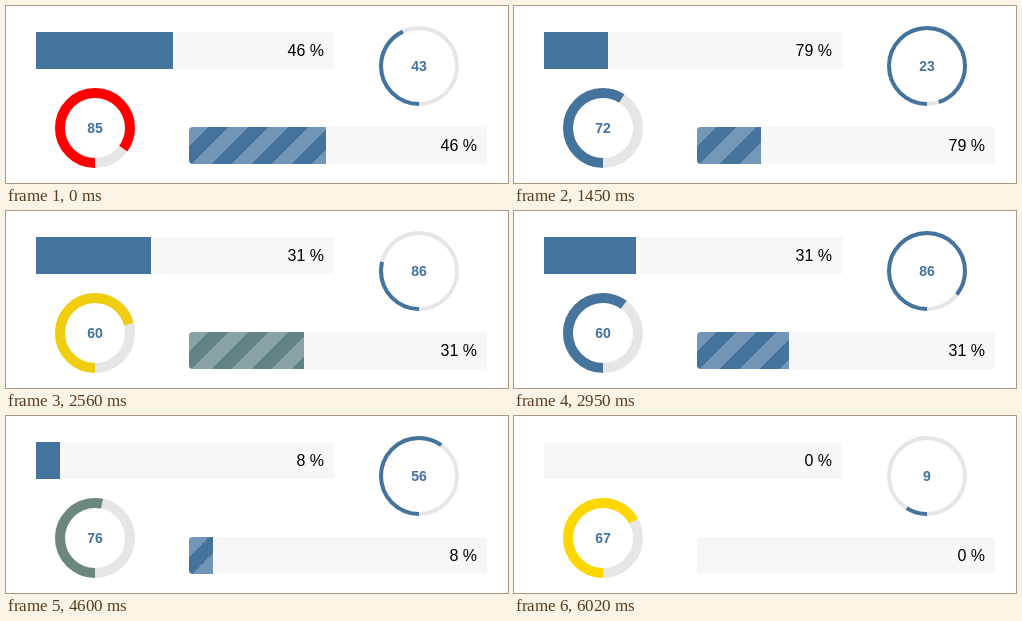
These frames come from a looping animation (502x177 px, 6.42 s). An HTML page:

```html
<!DOCTYPE html>
<html lang="en">
<head>
<meta charset="utf-8">
<style>
html, body { margin: 0; width: 100%; height: 100%; overflow: hidden; background: #fff; }
body { position: relative; font-family: "Liberation Sans", Arial, sans-serif; }
.bar { position: absolute; width: 298px; height: 37px; background: #f7f7f7; overflow: hidden; }
.bar i { display: block; height: 100%; background-color: #44739e; }
.bar b { position: absolute; right: 10px; top: 0; font: 16px/37px "Liberation Sans", Arial, sans-serif; color: #000; }
#plain { left: 30px; top: 26px; }
#striped { left: 183px; top: 121px; border-radius: 4px; }
#striped i {
  background-image: linear-gradient(135deg, #ffffff40 25%, #fff0 25%, #fff0 50%, #ffffff40 50%, #ffffff40 75%, #fff0 75%);
  background-size: 40px 40px;
}
.ring { position: absolute; width: 80px; height: 80px; }
.ring svg { position: absolute; left: 0; top: 0; transform: rotate(90deg); }
.ring circle { fill: none; stroke: #e6e6e6; }
.ring circle + circle { stroke: #44739e; }
.ring b { position: absolute; inset: 0; text-align: center; font-size: 14px; line-height: 80px; color: #44739e; }
#thick { left: 49px; top: 82px; }
#thick circle { stroke-width: 10px; }
#thin { left: 373px; top: 20px; }
#thin circle { stroke-width: 4px; }
</style>
</head>
<body>
<div class="bar" id="plain"><i></i><b></b></div>
<div class="bar" id="striped"><i></i><b></b></div>
<div class="ring" id="thick">
  <svg width="80" height="80"><circle cx="40" cy="40" r="35"/><circle cx="40" cy="40" r="35" pathLength="100"/></svg><b></b>
</div>
<div class="ring" id="thin">
  <svg width="80" height="80"><circle cx="40" cy="40" r="38"/><circle cx="40" cy="40" r="38" pathLength="100"/></svg><b></b>
</div>
<script>
const LOOP = 6420, BAR_TIME = 250, RING_TIME = 650;
const BLUE = [68, 115, 158], GOLD = [255, 215, 0], RED = [255, 0, 0];

// start time, bar value, thick ring value, thin ring value
const steps = [
  [0, 46, 85, 43],
  [376, 21, 59, 95],
  [1436, 79, 72, 23],
  [2376, 31, 60, 86],
  [3396, 21, 47, 61],
  [4356, 8, 76, 56],
  [5356, 0, 67, 9]
];

const $ = s => document.querySelector(s);
const clamp = x => Math.min(1, Math.max(0, x));
const mix = (a, b, p) => a + (b - a) * p;
const swing = x => 0.5 - Math.cos(x * Math.PI) / 2;
const cubic = x => x < 0.5 ? 4 * x ** 3 : 1 - 4 * (1 - x) ** 3;
const level = v => v > 80 ? RED : v > 60 ? GOLD : BLUE;
const blend = (a, b, p) => `rgb(${level(a).map((c, i) => Math.round(mix(c, level(b)[i], p)))})`;

function setBar(id, from, to, p) {
  const fill = $(id + " i");
  fill.style.width = mix(from, to, p) + "%";
  $(id + " b").textContent = to + " %";
  return fill;
}

function setRing(id, from, to, p) {
  const arc = $(id + " circle + circle");
  arc.style.strokeDasharray = mix(from, to, p) + " 200";
  $(id + " b").textContent = to;
  return arc;
}

function draw(now) {
  const t = now % LOOP;
  const n = steps.filter(s => s[0] <= t).length - 1;
  const to = steps[n], from = steps[Math.max(0, n - 1)];
  const p = swing(clamp((t - to[0]) / BAR_TIME));
  const q = cubic(clamp((t - to[0]) / RING_TIME));
  setBar("#plain", from[1], to[1], p);
  setBar("#striped", from[1], to[1], p).style.backgroundColor = blend(from[1], to[1], p);
  setRing("#thick", from[2], to[2], q).style.stroke = blend(from[2], to[2], q);
  setRing("#thin", from[3], to[3], q);
}

const start = performance.now();
function tick() {
  draw(performance.now() - start);
  requestAnimationFrame(tick);
}
tick();
</script>
</body>
</html>
```
